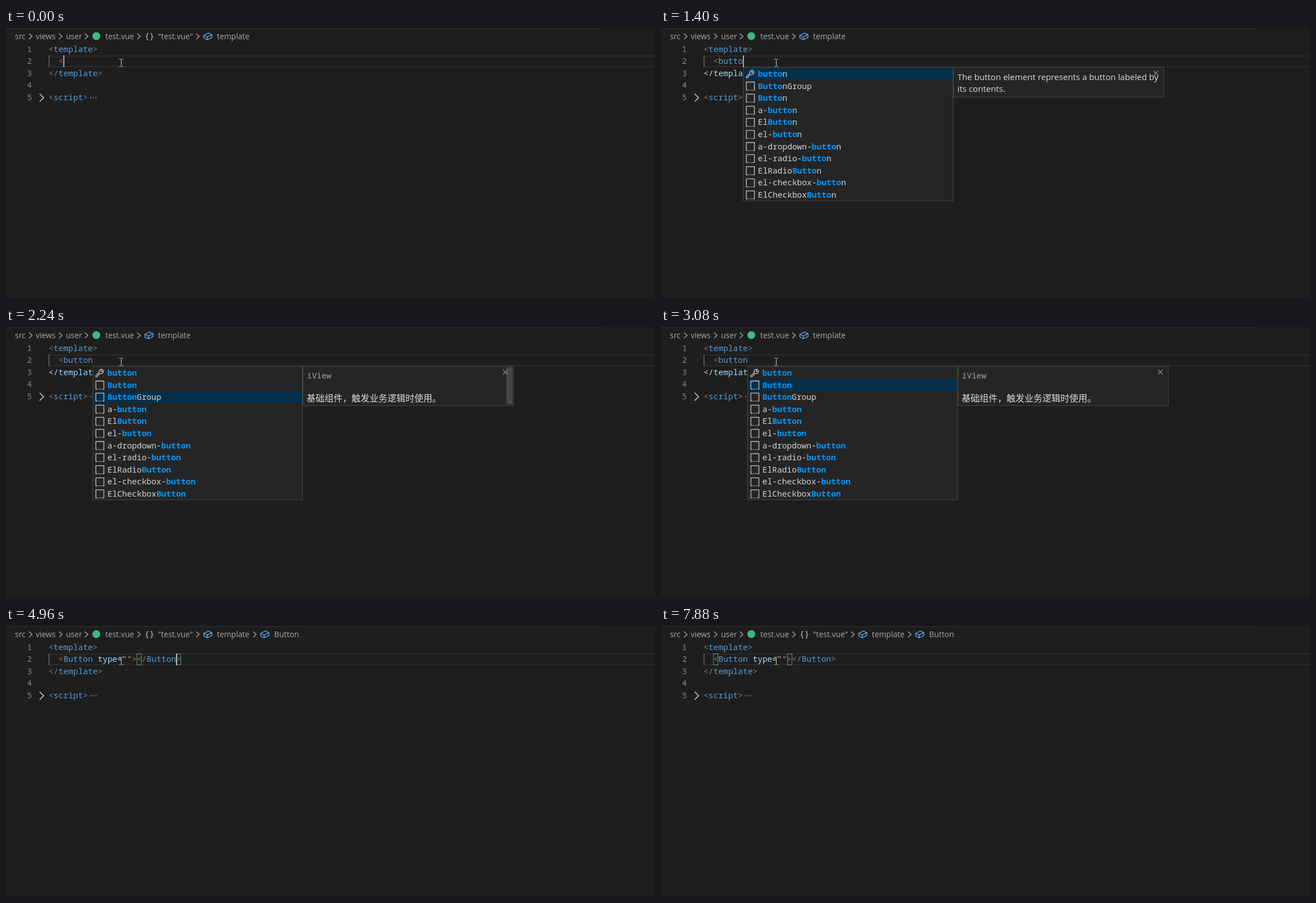
Recreate the animation shown at these times as an HTML page with a canvas. Size 1157 px wide and 484 px high, loop 8 s.

```html
<!DOCTYPE html>
<html lang="en">
<head>
<meta charset="utf-8">
<title>Code completion</title>
<style>
  html, body { margin: 0; width: 100%; height: 100%; overflow: hidden; background: #1e1e1e; }
  canvas { display: block; }
</style>
</head>
<body>
<canvas id="stage" width="1157" height="484"></canvas>
<script>
const ctx = document.getElementById('stage').getContext('2d');
const LOOP = 8000;
const LEFT = 76, CHAR = 8.74, TOP = 27.3, LINE = 21.6, BASE = 15.3;
const ROW_TOP = 49, ROW_HEIGHT = 21;
const MONO = '14.57px "Noto Sans Mono", monospace';
const CRUMB = '13.9px "Open Sans", sans-serif';
const DOC = '15.1px "Open Sans", sans-serif';
const CJK = '16px "Noto Sans CJK SC", "Noto Sans CJK", sans-serif';
const GREY = '#808080', BLUE = '#569cd6', LIGHT = '#9cdcfe', WHITE = '#d4d4d4';
const DOC_COLOR = '#dcdcdc', SLIDER = 'rgba(121,121,121,.4)';

const LABELS = ['button', 'ButtonGroup', 'Button', 'a-button', 'ElButton', 'el-button',
  'a-dropdown-button', 'el-radio-button', 'ElRadioButton', 'el-checkbox-button', 'ElCheckboxButton'];

const typed = word => [['<', GREY], [word, BLUE]];
const plainTag = [['<Button type=""></Button>', GREY]];
const colorTag = [['<', GREY], ['Button', BLUE], [' type', LIGHT], ['=', WHITE], ['""', '#ce9178'],
  ['></', GREY], ['Button', BLUE], ['>', GREY]];

// Each entry changes part of the editor state from its time on.
const TIMELINE = [
  [0, { line: [['<', '#f44747']], col: 3, cursor: true, crumbs: 'file', broken: false,
        query: '', popupCol: 0, selected: 0, listSlider: false, doc: 'html', docSlider: false,
        brackets: [], words: false, endStop: false }],
  [80, { line: typed('but'), col: 6, crumbs: 'short', broken: true, query: 'but', popupCol: 6, listSlider: true }],
  [480, { line: typed('butt'), col: 7 }],
  [600, { query: 'butt', popupCol: 7 }],
  [920, { listSlider: false }],
  [1080, { cursor: false }],
  [1400, { line: typed('butto'), col: 8, cursor: true, query: 'butto', popupCol: 8 }],
  [1640, { line: typed('button'), col: 9, query: 'button', popupCol: 9 }],
  [2080, { cursor: false }],
  [2240, { selected: 2, doc: 'component', docSlider: true }],
  [2280, { selected: 1 }],
  [2600, { cursor: true }],
  [3080, { cursor: false, docSlider: false }],
  [3520, { line: plainTag, col: 16, query: '' }],
  [3600, { cursor: true, endStop: true }],
  [3720, { line: colorTag, broken: false, brackets: [2, 17] }],
  [3840, { col: 27, endStop: false, brackets: [18, 26] }],
  [4320, { cursor: false }],
  [4760, { crumbs: 'full' }],
  [4840, { cursor: true }],
  [4960, { col: 26 }],
  [5240, { words: true }],
  [5480, { cursor: false }],
  [5720, { col: 25, cursor: true }],
  [6240, { cursor: false }],
  [6320, { col: 20, cursor: true }],
  [6560, { col: 19, words: false }],
  [6800, { col: 18 }],
  [6960, { col: 17 }],
  [7040, { brackets: [2, 17] }],
  [7360, { col: 16 }],
  [7880, { cursor: false }],
];

const stateAt = t => Object.assign({}, ...TIMELINE.filter(([at]) => at <= t).map(entry => entry[1]));
const colX = col => LEFT + col * CHAR;
const lineY = n => TOP + (n - 1) * LINE;

function rect(x, y, w, h, color) {
  ctx.fillStyle = color;
  ctx.fillRect(x, y, w, h);
}

function text(str, x, y, font, color) {
  ctx.font = font;
  ctx.fillStyle = color;
  ctx.fillText(str, x, y);
}

// Monospaced text on the editor's character grid.
function code(str, x, y, color, bold) {
  [...str].forEach((ch, i) => text(ch, x + i * CHAR, y, (bold ? 'bold ' : '') + MONO, color));
}

function codeLine(n, col, spans) {
  for (const [str, color] of spans) {
    code(str, colX(col), lineY(n) + BASE, color);
    col += str.length;
  }
}

function stroke(path, x, y, scale, color, width, dash = []) {
  ctx.save();
  ctx.translate(x, y);
  ctx.scale(scale, scale);
  ctx.strokeStyle = color;
  ctx.lineWidth = width / scale;
  ctx.setLineDash(dash);
  ctx.stroke(new Path2D(path));
  ctx.restore();
}

function panel(x, y, w, h) {
  rect(x, y, w, h, '#454545');
  rect(x + 1, y + 1, w - 2, h - 2, '#252526');
}

const crumbChevron = x => stroke('M0 0L5.5 5L0 10', x, 10, 1, '#a9a9a9', 1.4);
const crumbText = (str, x) => text(str, x, 20, CRUMB, '#a9a9a9');
const cube = x => stroke('M1.4 6.2L9 2.5L14.6 5.2V9.8L7 13.5L1.4 10.7ZL7 9L14.6 5.2M7 9V13.5',
  x - 1, 6.2, 1.1, '#62b3ff', 1.3);

function drawCrumbs(kind) {
  crumbText('src', 16);
  crumbText('views', 53);
  crumbText('user', 107);
  crumbText('test.vue', 177);
  [41, 94.5, 140.5, 234].forEach(crumbChevron);
  ctx.fillStyle = '#41b883';
  ctx.beginPath();
  ctx.arc(161, 14.5, 7, 0, 2 * Math.PI);
  ctx.fill();
  if (kind === 'short') {
    cube(247);
    crumbText('template', 271);
    return;
  }
  text('{}', 247, 19, MONO, '#c5c5c5');
  crumbText('"test.vue"', 271);
  crumbChevron(339);
  cube(352);
  crumbText('template', 376);
  if (kind === 'full') {
    crumbChevron(440.5);
    cube(453.5);
    crumbText('Button', 478);
  }
}

function drawEditor(s) {
  const mark = (x, w, color) => rect(x, ROW_TOP, w, ROW_HEIGHT, color);
  rect(LEFT, ROW_TOP, 1157 - LEFT, 2, '#2a2a2a');
  rect(LEFT, ROW_TOP + ROW_HEIGHT - 2, 1157 - LEFT, 2, '#2a2a2a');
  mark(LEFT, 1.3, '#707070');
  if (s.words) for (const col of [3, 20]) mark(colX(col), 6 * CHAR, '#474747');
  for (const col of s.brackets) {
    mark(colX(col), CHAR, 'rgba(0,100,0,.1)');
    ctx.strokeStyle = '#748a74';
    ctx.lineWidth = 1;
    ctx.strokeRect(Math.round(colX(col)) + .5, ROW_TOP + .5, 8, ROW_HEIGHT - 1);
  }
  for (let n = 1; n <= 5; n++) code(String(n), 37.5, lineY(n) + BASE, '#858585');
  codeLine(1, 0, [['<', GREY], ['template', BLUE], ['>', GREY]]);
  codeLine(2, 2, s.line);
  codeLine(3, 0, [['</', s.broken ? WHITE : GREY], ['template', s.broken ? LIGHT : BLUE], ['>', GREY]]);
  codeLine(5, 0, [['<', GREY], ['script', BLUE], ['>', GREY]]);
  for (let i = 0; i < 3; i++) rect(150 + i * 4.7, 123.5, 2, 2, GREY);
  stroke('M0 0L7 7L0 14', 60, 117.5, 1, '#c5c5c5', 1.7);
  if (s.endStop) mark(colX(27) + .2, 1.2, '#7c7c7c');
  if (s.cursor) mark(colX(s.col) + .2, 1.5, '#d8d8d8');
}

// Indices of the label's characters that match the query.
function matches(label, query) {
  const lower = label.toLowerCase(), start = lower.indexOf(query);
  let from = start < 0 ? 0 : start;
  return [...query].map(ch => {
    const at = lower.indexOf(ch, from);
    from = at + 1;
    return at;
  });
}

function drawList(s, x) {
  const labels = [...LABELS];
  if (s.query === 'button') [labels[1], labels[2]] = [labels[2], labels[1]];
  if (s.query === 'but') labels.push('blockquote');
  const height = labels.length * LINE;
  panel(x, 70, 375, height + 1.5);
  rect(x + 1, 71.3 + s.selected * LINE, 373, LINE, '#062f4a');
  labels.forEach((label, i) => {
    const y = 71.3 + i * LINE, hits = matches(label, s.query);
    if (label === 'button' || label === 'blockquote') {
      stroke('M1.8 12.4L7.3 7C6.3 4 8.5 1.2 12.2 2L10 4.6L11.3 6L14 3.8C15 7 12.2 9.9 8.9 8.7L3.6 14.1C2.4 15 1 13.6 1.8 12.4Z',
        x + 4.2, y + 2, 1.1, '#c5c5c5', 1.3);
    } else {
      stroke('M2 14.3H0V0H14.3V14.3H12.3', x + 6.2, y + 3.6, 1, '#c5c5c5', 1.3);
      stroke('M2 14.3H12.3', x + 6.2, y + 3.6, 1, '#c5c5c5', 1.3, [1.2, 1.2]);
    }
    [...label].forEach((ch, k) => {
      const hit = hits.includes(k);
      code(ch, x + 26.7 + k * CHAR, y + 15.7, hit ? '#0097fb' : WHITE, hit);
    });
  });
  if (s.listSlider) rect(x + 363, 72, 11, height - 1, SLIDER);
}

function drawDoc(s, x) {
  const isHtml = s.doc === 'html';
  panel(x, 70, 376, isHtml ? 54 : 71);
  if (isHtml) {
    text('The button element represents a button labeled by', x + 7.4, 93, DOC, DOC_COLOR);
    text('its contents.', x + 7.4, 114.3, DOC, DOC_COLOR);
  } else {
    code('iView', x + 7.4, 92, '#a4a4a4');
    text('基础组件\uff0c触发业务逻辑时使用。', x + 7, 133, CJK, DOC_COLOR);
  }
  if (s.docSlider) rect(x + 363, 72, 11, 66, SLIDER);
  stroke('M0 0L8.5 8.5M8.5 0L0 8.5', x + 357, 76.5, 1, '#8c8c8c', 1.2);
}

function draw(t) {
  const s = stateAt(t);
  rect(0, 0, 1157, 484, '#1e1e1e');
  rect(0, 0, 1060, 1.5, '#2b2b2b');
  rect(0, 482, 1157, 2, '#1a1a1a');
  drawCrumbs(s.crumbs);
  drawEditor(s);
  if (s.query) {
    const x = Math.floor(colX(s.popupCol) + .2);
    drawList(s, x);
    drawDoc(s, x + 375);
  }
  stroke('M0 .5H2.5M4.5 .5H7M3.5 1V13.5M0 14H2.5M4.5 14H7', 202, 55, 1, '#d0d0d0', 1);
}

const start = performance.now();
function frame() {
  draw((performance.now() - start) % LOOP);
  requestAnimationFrame(frame);
}
frame();
</script>
</body>
</html>
```
